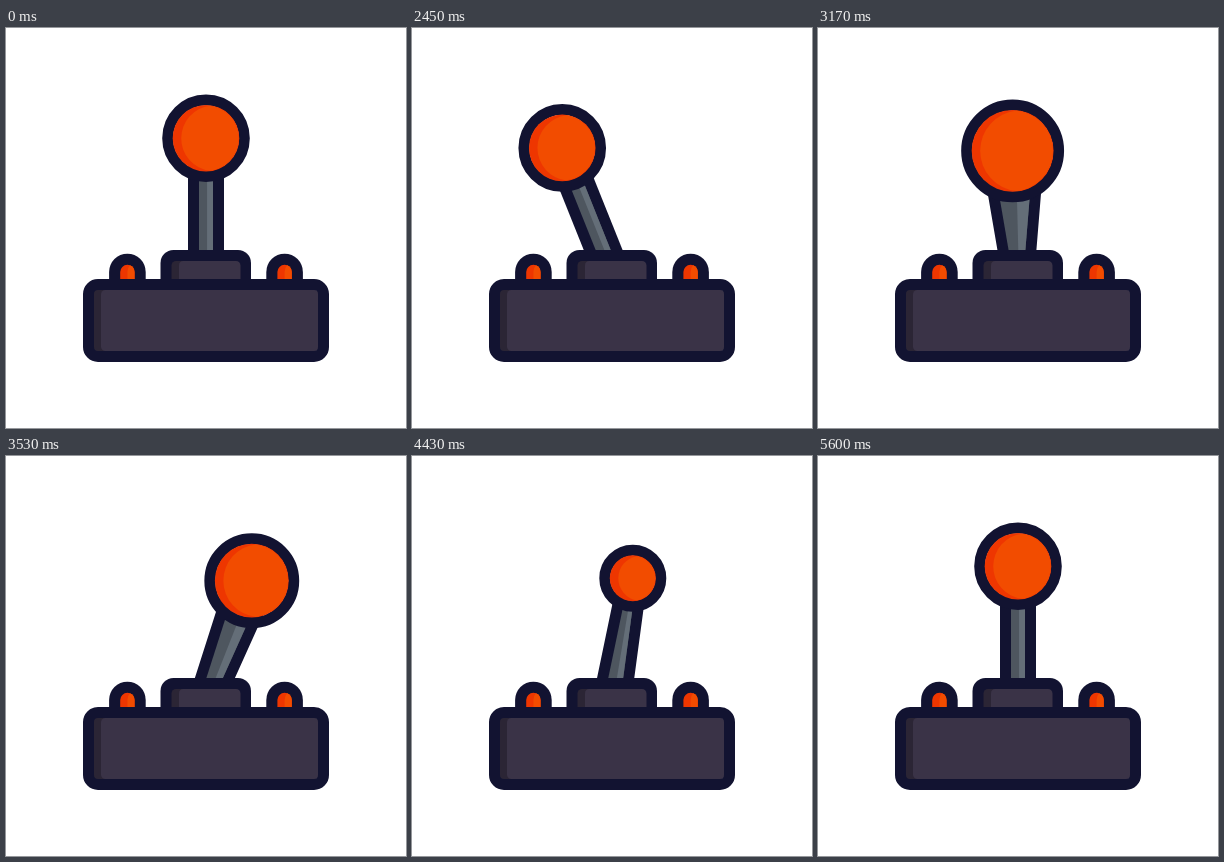
Animation, 400 px wide and 400 px high, one loop 5660 ms. Source, as an HTML page:

```html
<!DOCTYPE html>
<html lang="en">
<head>
<meta charset="utf-8">
<title>Joystick</title>
<style>
  html, body { margin: 0; width: 100%; height: 100%; overflow: hidden; background: #fff; }
  svg { display: block; width: 100vw; height: 100vh; }
  .ink { fill: #121331; }
  .line { fill: none; stroke: #121331; stroke-width: 11; }
  .body { fill: #3a3347; }
  .body-shade { fill: #2b2535; }
  .lit { fill: #f24c00; }
  .lit-shade { fill: #ee3600; }
  .metal { fill: #646e78; }
  .metal-shade { fill: #4e565f; }
</style>
</head>
<body>
<svg viewBox="0 0 400 400">
  <defs>
    <g id="button">
      <path class="ink" d="M-18.3 256v-12a18.3 18.3 0 0 1 36.6 0v12z"/>
      <path class="lit-shade" d="M-7.2 251v-7a7.2 7.2 0 0 1 14.4 0v7z"/>
      <path class="lit" d="M0 251v-7q0-4 2.5-6.7a7.2 7.2 0 0 1 4.7 6.7v7z"/>
    </g>
  </defs>

  <g id="arm">
    <path id="edge" class="ink" stroke="#121331" stroke-width="22"/>
    <path id="dark" class="metal-shade"/>
    <path id="light" class="metal"/>
  </g>
  <g id="ball">
    <circle id="rim" class="line"/>
    <circle id="fill" class="lit-shade"/>
    <path id="gloss" class="lit"/>
  </g>

  <use href="#button" x="121.4"/>
  <use href="#button" x="278.6"/>

  <path class="ink" d="M154.5 256v-21a13 13 0 0 1 13-13h64.5a13 13 0 0 1 13 13v21z"/>
  <path class="body-shade" d="M165.5 251v-13.500a4.500 4.500 0 0 1 4.500-4.500h20v18z"/>
  <path class="body" d="M173 251v-13.500q0-4.500 4.500-4.500h52.500a4.500 4.500 0 0 1 4.500 4.500v13.500z"/>

  <rect class="body-shade" x="83" y="257" width="60" height="71" rx="9"/>
  <rect class="body" x="95" y="262" width="219" height="61" rx="4.500"/>
  <rect class="line" x="82.500" y="256.500" width="235" height="72" rx="9.500"/>
</svg>

<script>
const LOOP = 5660, STEP = 30, MOVE = 2030;
const PIVOT = { x: 200, y: 244 };
const $ = id => document.getElementById(id);

// Smooth 0..1 progress between two times
function ease(t, from, to) {
  const u = Math.min(1, Math.max(0, (t - from) / (to - from)));
  return u * u * (3 - 2 * u);
}

// Sideways tilt in degrees and depth (1 toward the viewer, -1 away)
function pose(t) {
  if (t < 2540) return { tilt: -23.6 * ease(t, 2000, 2540), depth: 0 };
  if (t < 3860) {
    const a = Math.PI * ease(t, 2540, 3860);
    return { tilt: -23.8 * Math.cos(a), depth: Math.sin(a) };
  }
  const depth = -Math.sin(Math.PI * ease(t, 3860, 4760));
  if (t < 5180) return { tilt: 23.8 - 35.4 * ease(t, 3860, 5180), depth };
  return { tilt: -11.6 * (1 - ease(t, 5180, 5600)), depth };
}

function quad(x0, x1, x2, x3, len) {
  return `M${x0} 0L${x1} ${-len}H${x2}L${x3} 0Z`;
}

function draw(t) {
  const { tilt, depth } = pose(t);
  const near = Math.max(0, depth), far = Math.max(0, -depth);
  const len = 133.7 - 12.5 * (near + far);
  const r = 32.8 + 7.7 * near - 12.6 * far;

  const base = 7 - 1.4 * depth;
  const tip = 7 + 14 * near - 4 * far;
  const split = 0.15;
  $('arm').setAttribute('transform', `translate(${PIVOT.x} ${PIVOT.y}) rotate(${tilt})`);
  $('edge').setAttribute('d', quad(-base, -tip, tip, base, len));
  $('dark').setAttribute('d', quad(-base, -tip, tip, base, len));
  $('light').setAttribute('d', quad(base * split, tip * split, tip, base, len));

  const a = tilt * Math.PI / 180;
  const x = PIVOT.x + len * Math.sin(a), y = PIVOT.y - len * Math.cos(a);
  $('ball').setAttribute('transform', `translate(${x} ${y})`);
  $('rim').setAttribute('r', r + 5.5);
  $('fill').setAttribute('r', r + 0.5);
  const h = Math.sqrt(r * r - 16);
  $('gloss').setAttribute('d', `M4 ${-h}A${r} ${r} 0 0 1 4 ${h}A${r} ${r} 0 0 1 4 ${-h}Z`);
}

const start = performance.now();
function frame() {
  const t = (performance.now() - start) % LOOP;
  draw(t < MOVE ? 0 : MOVE + STEP * Math.floor((t - MOVE) / STEP));
  requestAnimationFrame(frame);
}
frame();
</script>
</body>
</html>
```
